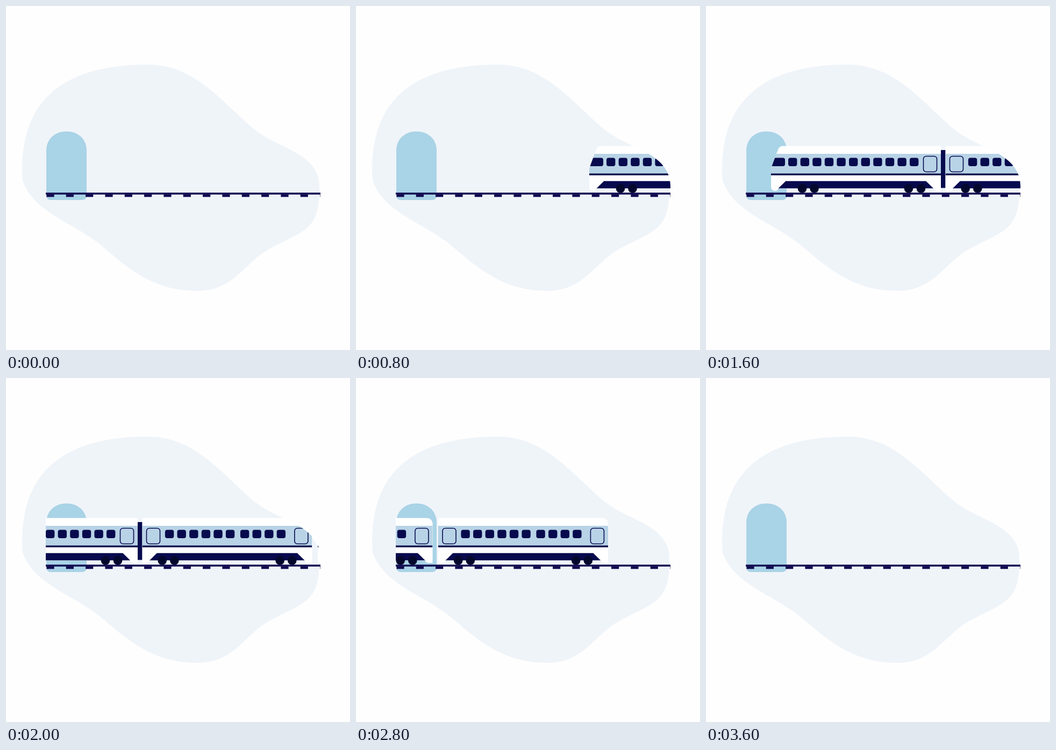
These frames come from a looping animation (640x640 px, 4 s). An HTML page:

```html
<!DOCTYPE html>
<html lang="en">
<head>
<meta charset="utf-8">
<title>Train</title>
<style>
  html, body { margin: 0; width: 100%; height: 100%; overflow: hidden; background: #fefefe; }
  svg { display: block; width: 100%; height: 100%; }
</style>
</head>
<body>
<svg viewBox="0 0 640 640">
  <defs>
    <clipPath id="view"><path d="M74 240H480C521 267 585 280 585 335V349H74Z"/></clipPath>
    <clipPath id="headClip"><path id="headShape" d="M0 302L10 275L13.5 266Q16 260.5 22 260.5H316V344H308Q304 344 302 339.5H14Q12 344 8 344Q0 344 0 336Z"/></clipPath>
    <clipPath id="coachClip"><path id="coachShape" d="M0 260.5H304Q316 260.5 316 273V344H308Q304 344 302 339.5H14Q12 344 8 344H0Z"/></clipPath>
  </defs>
  <path fill="#eff4f9" d="M30 305C30 190 90 109 265 109C365 109 420 205 480 242C520 267 583 280 583 335V340C584 425 545 418 480 458C440 485 420 530 355 530C260 530 210 470 165 436C115 400 50 380 31 325Q30 315 30 305Z"/>
  <path fill="#a9d3e6" d="M75 268A34.5 34.5 0 0 1 109.5 233.5H115.5A34.5 34.5 0 0 1 150 268V352Q150 361 141 361H84Q75 361 75 352Z"/>
  <g clip-path="url(#view)"><g id="train"></g></g>
  <path fill="none" stroke="#110a50" stroke-width="3.6" d="M74 349H585"/>
  <path fill="none" stroke="#110a50" stroke-width="5" stroke-dasharray="14.2 22.13" d="M75.4 352.8H584.6"/>
</svg>
<script>
const train = document.getElementById('train');
const navy = '#070a4d';

const rect = (x, y, w, h, fill, r = 0) =>
  `<rect x="${x}" y="${y}" width="${w}" height="${h}" rx="${r}" fill="${fill}"/>`;
const pane = (x, w = 16.4) => rect(x, 282.6, w, 15.4, navy, 4);
const panes = (x, n) => Array.from({ length: n }, (_, i) => pane(x + i * 22.6)).join('');
const door = x =>
  `<rect x="${x}" y="279.5" width="25" height="29" rx="5" fill="none" stroke="${navy}" stroke-width="1.6"/>`;
const wheels = xs => xs.map(x => `<circle cx="${x}" cy="339.6" r="8.3" fill="#04082c"/>`).join('');

function car(x, shape, fittings, axles) {
  return `<g transform="translate(${x})">
    <use href="#${shape}Shape" fill="#fff"/>
    <g clip-path="url(#${shape}Clip)">
      ${rect(0, 275, 316, 37, '#b8d3e6')}
      ${rect(0, 311.6, 316, 3.4, navy)}
      <path d="M13.3 339.6L27.3 325.7H288.3L302.3 339.6Z" fill="${navy}"/>
      ${fittings}
    </g>
    ${wheels(axles)}
  </g>`;
}

const coach = x => car(x, 'coach',
  door(8) + panes(42.4, 6) + panes(182.4, 4) + door(283.4),
  [37.2, 59.8, 256.2, 278.8]);

train.innerHTML =
  car(0, 'head', pane(-10, 36) + panes(32, 11) + door(283.5), [58, 80.5, 256, 279]) +
  rect(316, 268, 8.6, 70.5, navy) +
  coach(324.5) + coach(651);

// Nose position every 400 ms, with one extra point at each end.
const stops = [592, 587, 535, 434, 291, 121, -71, -279, -498, -719, -940, -1161, -1382];

function noseAt(ms) {
  const k = Math.floor(ms / 400), u = ms / 400 - k;
  const [a, b, c, d] = stops.slice(k, k + 4);
  return b + u / 2 * (c - a + u * (2 * a - 5 * b + 4 * c - d + u * (3 * (b - c) + d - a)));
}

function draw(now) {
  const ms = Math.min(Math.floor(now % 4000 / 100) * 100, 3600);
  train.setAttribute('transform', `translate(${noseAt(ms).toFixed(2)})`);
  requestAnimationFrame(draw);
}
draw(performance.now());
</script>
</body>
</html>
```
